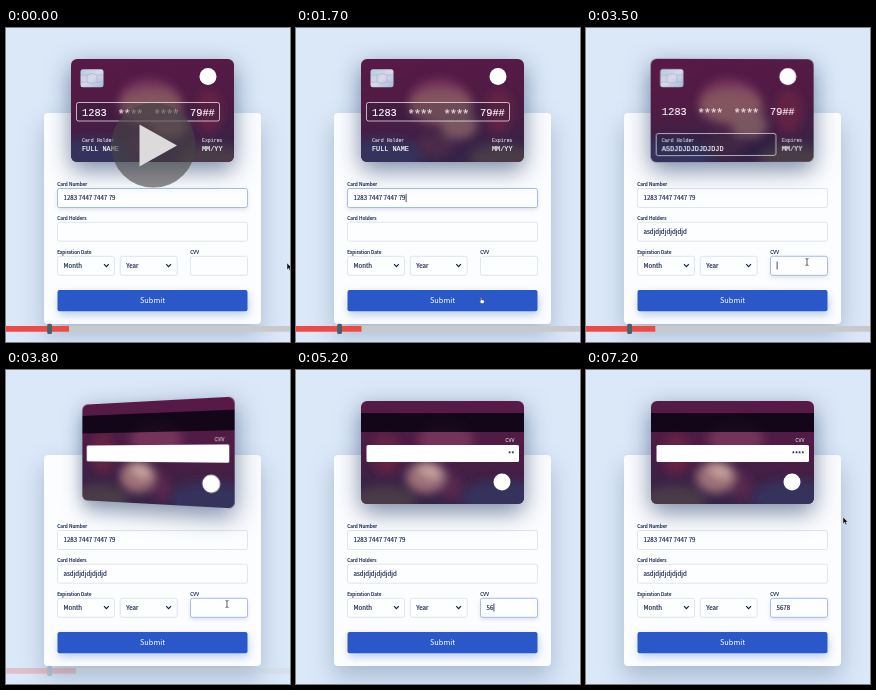
An HTML page that plays this animation: 284x314 px, repeating every 7.3 s.

```html
<!DOCTYPE html>
<html lang="en">
<head>
<meta charset="utf-8">
<title>Card form</title>
<style>
  html, body { margin: 0; width: 100%; height: 100%; overflow: hidden; background: #dbe8f8; }
  svg { position: absolute; left: 0; top: 0; }
  text { font-family: "Noto Sans CJK JP", "Noto Sans CJK SC", "Noto Sans CJK", "Open Sans", sans-serif; white-space: pre; }
  .mono text { font-family: "Liberation Mono", monospace; fill: #fff; stroke: #fff; stroke-width: .15; }
  .mono .stars { font-family: "Noto Sans Mono", monospace; opacity: .85; }
  .panel { position: absolute; left: 38px; top: 85px; width: 217px; height: 211px; border-radius: 4px;
    background: #fcfdff; box-shadow: 0 11px 23px rgba(90,116,148,.4); }
  .side { left: 65px; top: 31px; border-radius: 6px; overflow: hidden; backface-visibility: hidden;
    box-shadow: 0 8px 23px rgba(14,42,90,.55); }
  .label, .value { fill: #12234a; stroke: #12234a; stroke-width: .15; font-weight: 500; }
  .label { font-size: 4.8px; }
  .value { font-size: 6.16px; }
  .field { fill: #fdfeff; stroke: #d3dbe5; stroke-width: .7; }
  .field.on { stroke: #83a7e0; filter: drop-shadow(0 2px 2px rgba(32,56,117,.14)); }
  .small { font-size: 4.9px; opacity: .75; }
  .big { font-size: 6.84px; }
  .digits { font-size: 10.35px; }
</style>
</head>
<body>
<div class="panel"></div>

<svg width="284" height="314">
  <g id="fields">
    <rect class="field" x="51.5" y="160.5" width="190" height="19" rx="2"/>
    <rect class="field" x="51.5" y="194.2" width="190" height="19" rx="2"/>
    <rect class="field" x="184.5" y="228.3" width="57" height="19" rx="2"/>
    <rect class="field" x="51.5" y="228.3" width="57" height="19" rx="2"/>
    <rect class="field" x="114.2" y="228.3" width="57" height="19" rx="2"/>
  </g>
  <text class="label" x="51.3" y="157.8">Card Number</text>
  <text class="label" x="51.3" y="191.5">Card Holders</text>
  <text class="label" x="51.3" y="225.5">Expiration Date</text>
  <text class="label" x="184.3" y="225.5">CVV</text>
  <text class="value" id="number" x="57.5" y="172.2">1283 7447 7447 79</text>
  <text class="value" id="holder" x="57.5" y="205.9"></text>
  <text class="value" id="cvv" x="190.5" y="239.8"></text>
  <text class="value" x="57.5" y="239.8">Month</text>
  <text class="value" x="120.2" y="239.8">Year</text>
  <path d="M98 236.2l2.4 2.4 2.4-2.4M160.2 236.2l2.4 2.4 2.4-2.4" fill="none" stroke="#12234a" stroke-width="1.2"/>
  <rect id="caret" width=".8" height="8" fill="#12234a"/>
  <rect x="51.5" y="262" width="190" height="21.2" rx="2" fill="#2b58c8" style="filter:drop-shadow(1px 4px 4px rgba(35,100,210,.3))"/>
  <text x="146.5" y="275.3" text-anchor="middle" font-size="7.4" font-weight="500" fill="#fff">Submit</text>
</svg>

<svg id="front" class="side mono" width="163" height="103">
  <defs>
    <linearGradient id="base" x2=".15" y2="1">
      <stop offset="0" stop-color="#591948"/>
      <stop offset=".5" stop-color="#4e1c44"/>
      <stop offset="1" stop-color="#362347"/>
    </linearGradient>
    <linearGradient id="chip" x2="1" y2="1">
      <stop offset="0" stop-color="#b4cbe2"/>
      <stop offset=".5" stop-color="#d9d8ea"/>
      <stop offset="1" stop-color="#a5b9da"/>
    </linearGradient>
    <filter id="soft" x="-50%" y="-50%" width="200%" height="200%"><feGaussianBlur stdDeviation="5"/></filter>
    <g id="art">
      <rect width="163" height="103" fill="url(#base)"/>
      <g filter="url(#soft)">
        <ellipse cx="22" cy="97" rx="42" ry="18" fill="#36305c"/>
        <ellipse cx="140" cy="99" rx="32" ry="14" fill="#4a3a46"/>
        <ellipse cx="78" cy="38" rx="28" ry="18" fill="#74305a"/>
        <ellipse cx="138" cy="52" rx="14" ry="22" fill="#642344"/>
      </g>
    </g>
  </defs>
  <use href="#art"/>
  <g filter="url(#soft)">
    <ellipse cx="80" cy="47" rx="32" ry="18" fill="#82545e"/>
    <ellipse cx="98" cy="66" rx="18" ry="14" fill="#7a5660"/>
    <ellipse cx="74" cy="86" rx="18" ry="12" fill="#4c2a4a"/>
  </g>
  <rect x="9.5" y="10.3" width="23" height="18" rx="2.5" fill="url(#chip)"/>
  <path d="M10 16h6v7h-6M32 16h-6v7h6M16 16q5-3 10 0M16 23q5 3 10 0" fill="none" stroke="#94a6c6" stroke-width=".5"/>
  <circle cx="137" cy="17.5" r="8.5" fill="#fff"/>
  <rect id="focus" rx="2" fill="rgba(8,20,47,.16)" stroke="#fff" stroke-opacity=".75" stroke-width=".9"/>
  <g id="digits"></g>
  <text class="small" x="11" y="82.7">Card Holder</text>
  <text class="small" x="131" y="82.7">Expires</text>
  <text class="big" id="blank" x="11" y="92">FULL NAME</text>
  <text class="big" x="131" y="92">MM/YY</text>
  <g id="name"></g>
</svg>

<svg id="back" class="side" width="163" height="103">
  <use href="#art" transform="matrix(-1 0 0 1 163 0)"/>
  <g filter="url(#soft)">
    <ellipse cx="65" cy="76" rx="20" ry="16" fill="#9c6f78"/>
    <ellipse cx="69" cy="70" rx="12" ry="6" fill="#c9a59d" transform="rotate(20 69 70)"/>
    <ellipse cx="91" cy="86" rx="10" ry="14" fill="#58274f"/>
  </g>
  <rect y="12" width="163" height="19" fill="#06020f" fill-opacity=".82"/>
  <text x="153.5" y="41.3" text-anchor="end" font-size="5.2" font-weight="500" fill="#fff">CVV</text>
  <rect x="5.5" y="44" width="152.5" height="17" rx="1.5" fill="#fff"/>
  <text id="stars" x="153.5" y="55" text-anchor="end" font-size="6.3" font-weight="700" fill="#12234a"></text>
  <circle cx="141" cy="81" r="8.5" fill="#fff"/>
</svg>

<svg width="284" height="314">
  <g id="bar">
    <rect y="298" width="284" height="5.7" fill="#c8c9cc"/>
    <rect id="played" y="298" height="5.7" fill="#ee4a45"/>
    <rect x="41.2" y="295.7" width="4.8" height="10.3" rx="1.5" fill="#48606b"/>
  </g>
  <g id="play">
    <circle cx="147.3" cy="117.3" r="42.3" fill="#484446" fill-opacity=".62"/>
    <path d="M133.5 96.500v42l37.500-21z" fill="#dcdadb"/>
  </g>
  <g id="cursor" stroke-linejoin="round">
    <path d="M0 0v6.800l1.600-1.500 1.100 2.500 1.200-.5-1.100-2.400h2.100z" fill="#111" stroke="#fff" stroke-width=".4"/>
    <path d="M-1.500-.5q.8-.5 1 .4v1.800l2.400.6q.7.300.5 1l-.5 2.200h-2.900l-1.700-2.200q.2-.8 1.200 0z" fill="#fff" stroke="#222" stroke-width=".4"/>
    <path d="M-1.500-3.500q1.500 0 1.500 1v5q0 1-1.500 1M1.500-3.500q-1.500 0-1.500 1M1.500 3.500q-1.500 0-1.500-1" fill="none" stroke="#222" stroke-width=".7"/>
  </g>
</svg>

<script>
const $ = id => document.getElementById(id);
const LOOP = 7300, STEP = 100;
const START = 500, HOLDER_AT = 2000, CVV_AT = 3450;
const NAME = 'asdjdjdjdjdjdjd', nameKeys = [...NAME].map((_, i) => 2100 + i * 40);
const CVV = '5678', cvvKeys = [4900, 5100, 5400, 5650];

const clamp = v => Math.min(1, Math.max(0, v));
const mix = (a, b, p) => a + (b - a) * p;
const set = (el, attrs) => { for (const k in attrs) el.setAttribute(k, attrs[k]); };
const show = (el, on) => { el.style.display = on ? '' : 'none'; };
const count = (keys, t) => keys.filter(k => k <= t).length;

// cubic-bezier(.71, .03, .56, .85)
function ease(x) {
  x = clamp(x);
  const curve = (a, b, s) => 3 * (1 - s) ** 2 * s * a + 3 * (1 - s) * s * s * b + s ** 3;
  let lo = 0, hi = 1;
  for (let i = 0; i < 20; i++) {
    const m = (lo + hi) / 2;
    if (curve(.71, .56, m) < x) lo = m; else hi = m;
  }
  return curve(.03, .85, lo);
}

function addText(parent, cls, x, y, str) {
  const el = document.createElementNS('http://www.w3.org/2000/svg', 'text');
  set(el, { class: cls, x, y });
  el.textContent = str;
  return $(parent).appendChild(el);
}
['1283', '****', '****', '79##'].forEach((s, i) => {
  const hidden = s[0] === '*';
  addText('digits', hidden ? 'digits stars' : 'digits', 11 + i * 36, hidden ? 57.5 : 56.5, s);
});
const letters = [...NAME.toUpperCase()].map((c, i) => addText('name', 'big', 11 + i * 4.1, 92, c));

// Each run: time, x, y
const runs = [
  [[0, 281, 235], [START, 281, 235], [1200, 238, 258], [1600, 186, 270], [1750, 186, 270], [2000, 150, 204], [2099, 150, 204]],
  [[2900, 150, 204], [3400, 221, 234], [4899, 221, 234]],
  [[5950, 221, 234], [6300, 240, 124], [6700, 257, 147], [LOOP, 257, 147]]
];
function pointer(t) {
  const run = runs.find(r => t >= r[0][0] && t <= r[r.length - 1][0]);
  if (!run) return null;
  const i = Math.max(1, run.findIndex(p => p[0] >= t));
  const [a, b] = [run[i - 1], run[i]];
  let p = clamp((t - a[0]) / (b[0] - a[0]));
  p = p * p * (3 - 2 * p);
  return [mix(a[1], b[1], p), mix(a[2], b[2], p)];
}

const fields = [...$('fields').children];
const inside = (el, x, y) => {
  const b = el.getBBox();
  return x > b.x && x < b.x + b.width && y > b.y && y < b.y + b.height;
};

function drawCursor(t) {
  const pos = pointer(t);
  show($('cursor'), pos);
  if (!pos) return;
  const [x, y] = pos;
  const overButton = x > 51 && x < 241 && y > 262 && y < 283;
  const kind = overButton ? 1 : fields.slice(0, 3).some(f => inside(f, x, y)) ? 2 : 0;
  [...$('cursor').children].forEach((p, i) => show(p, i === kind));
  set($('cursor'), { transform: `translate(${x} ${y})` });
}

function drawForm(t) {
  const typed = count(nameKeys, t), code = count(cvvKeys, t);
  $('holder').textContent = NAME.slice(0, typed);
  $('cvv').textContent = CVV.slice(0, code);
  $('stars').textContent = '*'.repeat(code);

  const active = t < HOLDER_AT ? 0 : t < CVV_AT ? 1 : 2;
  fields.forEach((f, i) => f.classList.toggle('on', i === active));
  const since = [START, nameKeys[typed - 1] || HOLDER_AT, cvvKeys[code - 1] || CVV_AT][active];
  const input = $(['number', 'holder', 'cvv'][active]);
  const width = input.textContent ? input.getComputedTextLength() : 0;
  set($('caret'), { x: +input.getAttribute('x') + width + .2, y: input.getAttribute('y') - 6.3 });
  show($('caret'), t >= START && (t - since) % 530 < 265);
}

function drawCard(t) {
  const f = ease((t - HOLDER_AT) / 175);
  set($('focus'), {
    x: 5.5, y: mix(43.5, 74.5, f), width: mix(143, 119.5, f), height: mix(18.5, 22, f),
    opacity: 1 - ease((t - CVV_AT) / 175)
  });
  $('blank').style.opacity = 1 - clamp((t - nameKeys[0] + 60) / 120);
  letters.forEach((el, i) => {
    const p = clamp((t - nameKeys[i]) / 160) ** 3;
    set(el, { opacity: p, transform: `translate(${(1 - p) * 3.8} 0) rotate(${(1 - p) * 45} ${13 + i * 4.1} 90)` });
  });
  const turn = 180 * ease((t - CVV_AT - 20) / 400);
  $('front').style.transform = `perspective(381px) rotateY(${turn}deg)`;
  $('back').style.transform = `perspective(381px) rotateY(${turn - 180}deg)`;
}

function drawPlayer(t) {
  show($('play'), t < 100);
  set($('played'), { width: 63 + Math.max(0, t - START) * .0021 });
  $('bar').style.opacity = clamp((3830 - t) / 120);
}

const begin = performance.now();
function frame() {
  const now = (performance.now() - begin) % LOOP;
  const t = Math.floor(now / STEP) * STEP;
  drawForm(t);
  drawCard(t);
  drawPlayer(t);
  drawCursor(t);
  requestAnimationFrame(frame);
}
frame();
</script>
</body>
</html>
```
